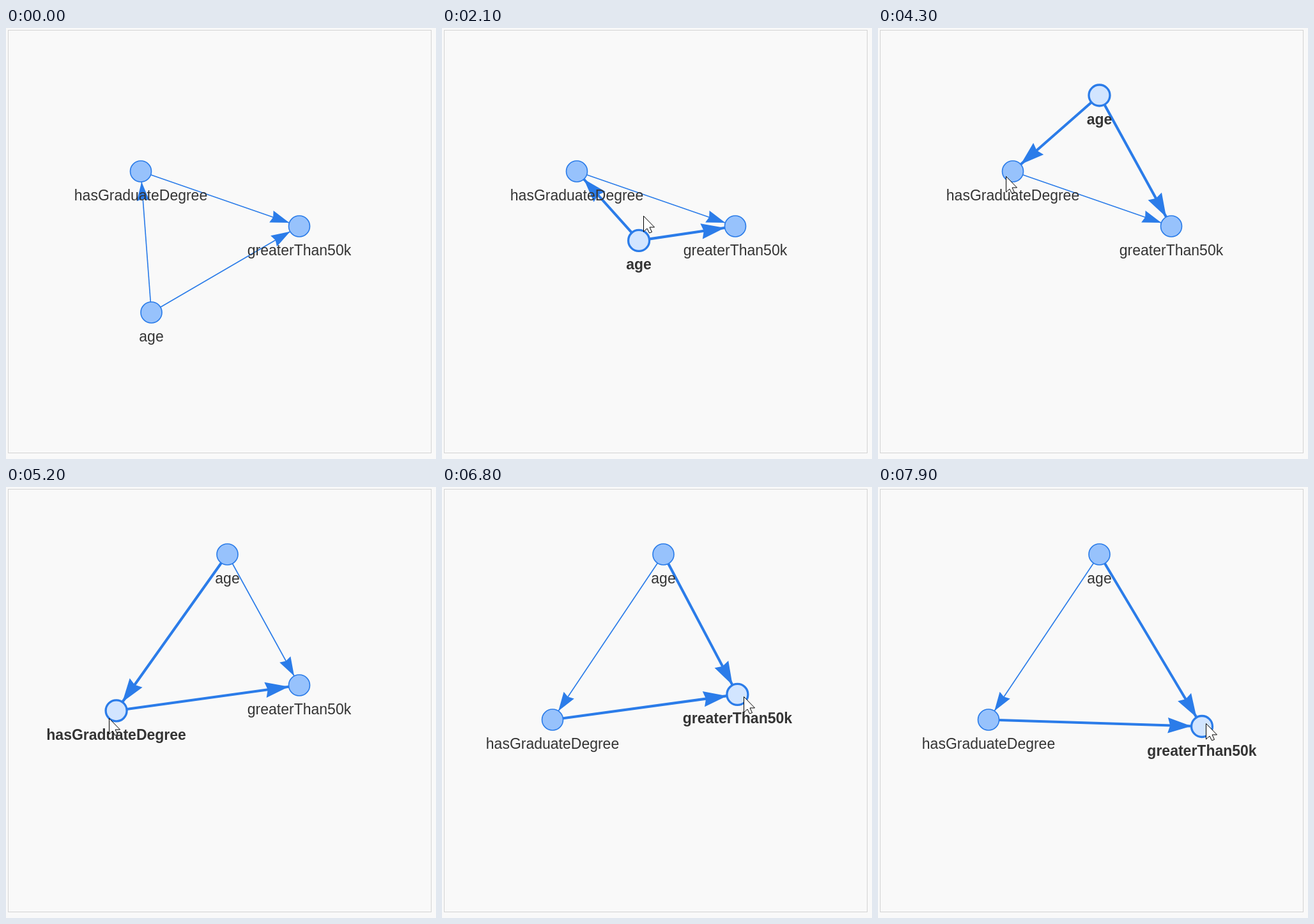
These frames come from a looping animation (673 px wide and 675 px high, 8 s). An HTML page with a canvas:

```html
<!DOCTYPE html>
<html lang="en">
<head>
<meta charset="utf-8">
<title>Dragging graph nodes</title>
<style>
  html, body { margin: 0; width: 100%; height: 100%; overflow: hidden; background: #f9f9f9; }
  canvas { display: block; }
</style>
</head>
<body>
<canvas id="stage" width="673" height="675"></canvas>
<script>
const ctx = document.getElementById('stage').getContext('2d');
const LOOP = 8000, STEP = 100, LAG = 60;
const RADIUS = 16.5, BLUE = '#2b7ce9';

// Pointer path: time, x, y
const pointer = [
  [400, 501, 215], [600, 446, 258], [1000, 262, 398], [1200, 221, 434], [1400, 220, 445],
  [1740, 220, 445], [1900, 252, 415], [2000, 291, 358], [2100, 315, 294], [2300, 338, 202],
  [2500, 342, 152], [2800, 342, 107], [3400, 342, 107], [3540, 339, 105], [3650, 339, 105],
  [3800, 316, 126], [4200, 207, 226], [4300, 200, 232],
  [4600, 200, 232], [4800, 190, 268], [5100, 162, 355], [5200, 161, 362], [5300, 162, 372],
  [5600, 162, 372], [5800, 185, 373], [6200, 460, 318], [6300, 482, 309], [6400, 465, 305],
  [6600, 465, 305], [6700, 466, 314], [6900, 478, 341], [7200, 505, 364],
  [7400, 505, 364], [7500, 511, 369], [7800, 511, 369], [7840, 513, 369.5]
];

// Each node follows the pointer between grab and drop
const nodes = [
  { label: 'age', x: 227.5, y: 445.5, grab: 1740, drop: 3600, from: 1800, to: 4600 },
  { label: 'hasGraduateDegree', x: 211, y: 224.5, grab: 4600, drop: 5500, from: 4600, to: 6700 },
  { label: 'greaterThan50k', x: 459, y: 310.5, grab: 6600, drop: LOOP, from: 6700, to: LOOP }
];
const edges = [[0, 1], [0, 2], [1, 2]];

function pointerAt(t) {
  const i = pointer.findIndex(k => k[0] > t);
  if (i < 1) return pointer.at(i).slice(1);
  const [t0, x0, y0] = pointer[i - 1], [t1, x1, y1] = pointer[i];
  const f = (t - t0) / (t1 - t0);
  return [x0 + (x1 - x0) * f, y0 + (y1 - y0) * f];
}

function place(node, t) {
  const [x0, y0] = pointerAt(node.grab);
  const [x1, y1] = pointerAt(Math.min(Math.max(t - LAG, node.grab), node.drop));
  return {
    label: node.label,
    x: node.x + x1 - x0,
    y: node.y + y1 - y0,
    selected: t >= node.from && t < node.to
  };
}

function polygon(points) {
  ctx.beginPath();
  points.forEach(([x, y]) => ctx.lineTo(x, y));
  ctx.closePath();
}

function drawEdge(a, b) {
  const thick = a.selected || b.selected;
  const size = thick ? 37 : 29.7;
  const angle = Math.atan2(b.y - a.y, b.x - a.x);
  ctx.strokeStyle = ctx.fillStyle = BLUE;
  ctx.lineWidth = thick ? 4.1 : 1.65;
  ctx.beginPath();
  ctx.moveTo(a.x, a.y);
  ctx.lineTo(b.x, b.y);
  ctx.stroke();
  ctx.save();
  ctx.translate(b.x - RADIUS * Math.cos(angle), b.y - RADIUS * Math.sin(angle));
  ctx.rotate(angle);
  ctx.scale(size, size);
  polygon([[0, 0], [-1, 0.33], [-0.9, 0], [-1, -0.33]]);
  ctx.fill();
  ctx.restore();
}

function drawNode({ label, x, y, selected }) {
  ctx.beginPath();
  ctx.arc(x, y, RADIUS, 0, 2 * Math.PI);
  ctx.fillStyle = selected ? '#d2e5ff' : '#97c2fc';
  ctx.fill();
  ctx.strokeStyle = BLUE;
  ctx.lineWidth = selected ? 3.3 : 1.65;
  ctx.stroke();
  ctx.font = (selected ? 'bold ' : '') + '23px Arial, "Liberation Sans", sans-serif';
  ctx.textAlign = 'center';
  ctx.fillStyle = '#343434';
  ctx.fillText(label, x, y + 45.5);
}

function drawPointer([x, y]) {
  ctx.save();
  ctx.translate(Math.round(x) + 0.5, Math.round(y) + 0.5);
  polygon([[0, 0], [0, 24.5], [5.5, 19.5], [9, 26.5], [13, 25], [9.5, 17.5], [17, 17.5]]);
  ctx.fillStyle = '#fff';
  ctx.fill();
  ctx.strokeStyle = '#000';
  ctx.lineWidth = 1;
  ctx.stroke();
  ctx.restore();
}

function draw(t) {
  ctx.fillStyle = '#f9f9f9';
  ctx.fillRect(0, 0, 673, 675);
  ctx.strokeStyle = '#d3d3d3';
  ctx.lineWidth = 1;
  ctx.strokeRect(3.5, 3.5, 662, 662);
  const placed = nodes.map(n => place(n, t));
  edges.forEach(([a, b]) => drawEdge(placed[a], placed[b]));
  placed.sort((a, b) => a.selected - b.selected).forEach(drawNode);
  if (t >= pointer[0][0]) drawPointer(pointerAt(t));
}

const start = performance.now();
function tick() {
  const t = (performance.now() - start) % LOOP;
  draw(Math.floor(t / STEP) * STEP);
  requestAnimationFrame(tick);
}
tick();
</script>
</body>
</html>
```
